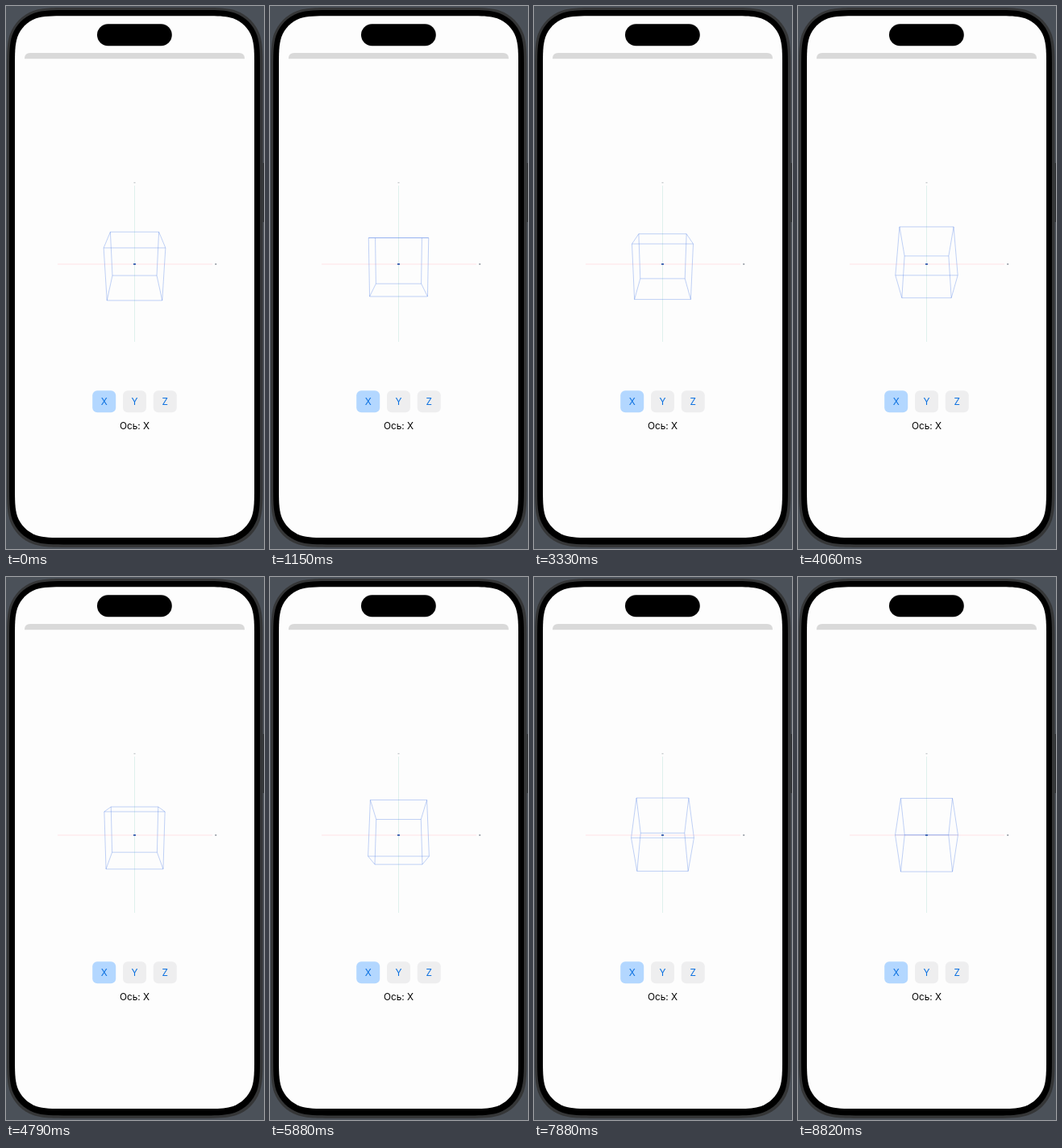
Animation of 320x671 px, one loop 8.85 s. Source, as an HTML page:

```html
<!DOCTYPE html>
<html lang="ru">
<head>
<meta charset="utf-8">
<title>Вращение куба</title>
<style>
  html, body { margin: 0; width: 100%; height: 100%; overflow: hidden; background: #4b5159; }
  svg { display: block; width: 100vw; height: 100vh; }
  text { font-family: Inter, "Noto Sans", sans-serif; font-size: 11.8px; text-anchor: middle; }
</style>
</head>
<body>
<svg viewBox="0 0 320 671" preserveAspectRatio="none">
  <rect width="320" height="671" fill="#4b5159"/>
  <rect x="318.5" y="194" width="1.5" height="73" fill="#2e3033"/>
  <g id="phone"></g>
  <rect x="113" y="22.2" width="92.8" height="27" rx="13.5" fill="#000"/>
  <path d="M23 65.2v-.2q0-7 7-7h259q7 0 7 7v.2z" fill="#d9d9d9"/>

  <path d="M64 319H256" stroke="#ffd3d8" stroke-width=".65"/>
  <path d="M159.5 222V415" stroke="#cfe9e3" stroke-width=".65"/>
  <rect x="158.5" y="217.8" width="2" height="1" fill="#b4b8bd"/>
  <rect x="259.2" y="318.4" width="2" height="1.2" fill="#6d7580"/>
  <g id="edges" stroke="#4f7fe6" stroke-width=".36"></g>
  <rect x="157.9" y="317.9" width="3.2" height="2" rx=".6" fill="#4468b4"/>

  <g id="buttons"></g>
  <text x="159.5" y="523" fill="#000">Ось: X</text>
</svg>
<script>
const LOOP = 8850;
const CENTER = { x: 159.5, y: 318.8 };
const SCALE = 32.05;
const CAMERA = 8;

// [tick, angle in degrees]; the first two poses are held by a slow start
const KEYS = [[0, 68.5], [6, 31], [11, 25], [38, -127.8], [78, -376.4], [110, -567.5],
  [158, -842.8], [229, -1252.7], [291, -1620]];
const HELD = 2;

function add(parent, tag, attrs, text = '') {
  const node = document.createElementNS('http://www.w3.org/2000/svg', tag);
  for (const name in attrs) node.setAttribute(name, attrs[name]);
  node.textContent = text;
  return parent.appendChild(node);
}

// Half of a continuous-curvature corner, as [along one side, along the other] in radii
const CURVE = [[1.529, 0], [1.088, 0], [0.868, 0], [0.631, 0.075], [0.373, 0.169]];
const CORNER = [...CURVE, ...CURVE.map(([a, b]) => [b, a]).reverse()];

function smoothRect(x, y, w, h, r) {
  const corner = (cx, cy, sx, sy, flip) => {
    const points = CORNER.map(([a, b]) => `${cx + sx * a * r} ${cy + sy * b * r}`);
    if (flip) points.reverse();
    return `L${points[0]}C${points.slice(1).join(' ')}`;
  };
  const path = corner(x, y, 1, 1, true) + corner(x + w, y, -1, 1, false)
    + corner(x + w, y + h, -1, -1, true) + corner(x, y + h, 1, -1, false);
  return 'M' + path.slice(1) + 'Z';
}

const phone = document.getElementById('phone');
[
  ['#353637', 1, 2, 317.5, 667, 52],
  ['#000', 4, 5, 311, 660.5, 49],
  ['#fdfdfd', 11, 12.2, 297, 644.8, 41.6],
].forEach(([fill, ...box]) => add(phone, 'path', { d: smoothRect(...box), fill }));

const buttons = document.getElementById('buttons');
['X', 'Y', 'Z'].forEach((axis, i) => {
  const x = 107.2 + i * 37.8;
  add(buttons, 'rect', { x, y: 475.3, width: 29, height: 27, rx: 6, fill: i ? '#eeeeef' : '#b3d7ff' });
  add(buttons, 'text', { x: x + 14.5, y: 493.2, fill: '#0b70e0' }, axis);
});

const group = document.getElementById('edges');
const edges = Array.from({ length: 12 }, () => add(group, 'line', {}));

// The display refreshes 30 times per 910 ms, on whole hundredths of a second.
const tickAt = ms => Math.ceil((Math.floor(ms / 10) + 1) * 30 / 91) - 1;

function angleAt(tick) {
  let i = KEYS.length - 1;
  while (KEYS[i][0] > tick) i--;
  const [start, from] = KEYS[i];
  if (i < HELD || i === KEYS.length - 1) return from;
  const [end, to] = KEYS[i + 1];
  return from + (to - from) * (tick - start) / (end - start);
}

// Corner k of the square cross-section, on the left (-1) or right (1) face
function project(side, k, angle) {
  const phi = (angle + 90 * k) * Math.PI / 180;
  const zoom = SCALE / (1 - Math.SQRT2 * Math.sin(phi) / CAMERA);
  return [CENTER.x + side * zoom, CENTER.y - Math.SQRT2 * Math.cos(phi) * zoom];
}

function setLine(line, [x1, y1], [x2, y2]) {
  Object.entries({ x1, y1, x2, y2 }).forEach(([name, v]) => line.setAttribute(name, v.toFixed(2)));
}

function render(ms) {
  const angle = angleAt(tickAt(ms));
  for (let k = 0; k < 4; k++) {
    const left = project(-1, k, angle);
    const right = project(1, k, angle);
    setLine(edges[k], left, right);
    setLine(edges[4 + k], left, project(-1, k + 1, angle));
    setLine(edges[8 + k], right, project(1, k + 1, angle));
  }
}

const started = performance.now();
function loop() {
  render((performance.now() - started) % LOOP);
  requestAnimationFrame(loop);
}
loop();
</script>
</body>
</html>
```
